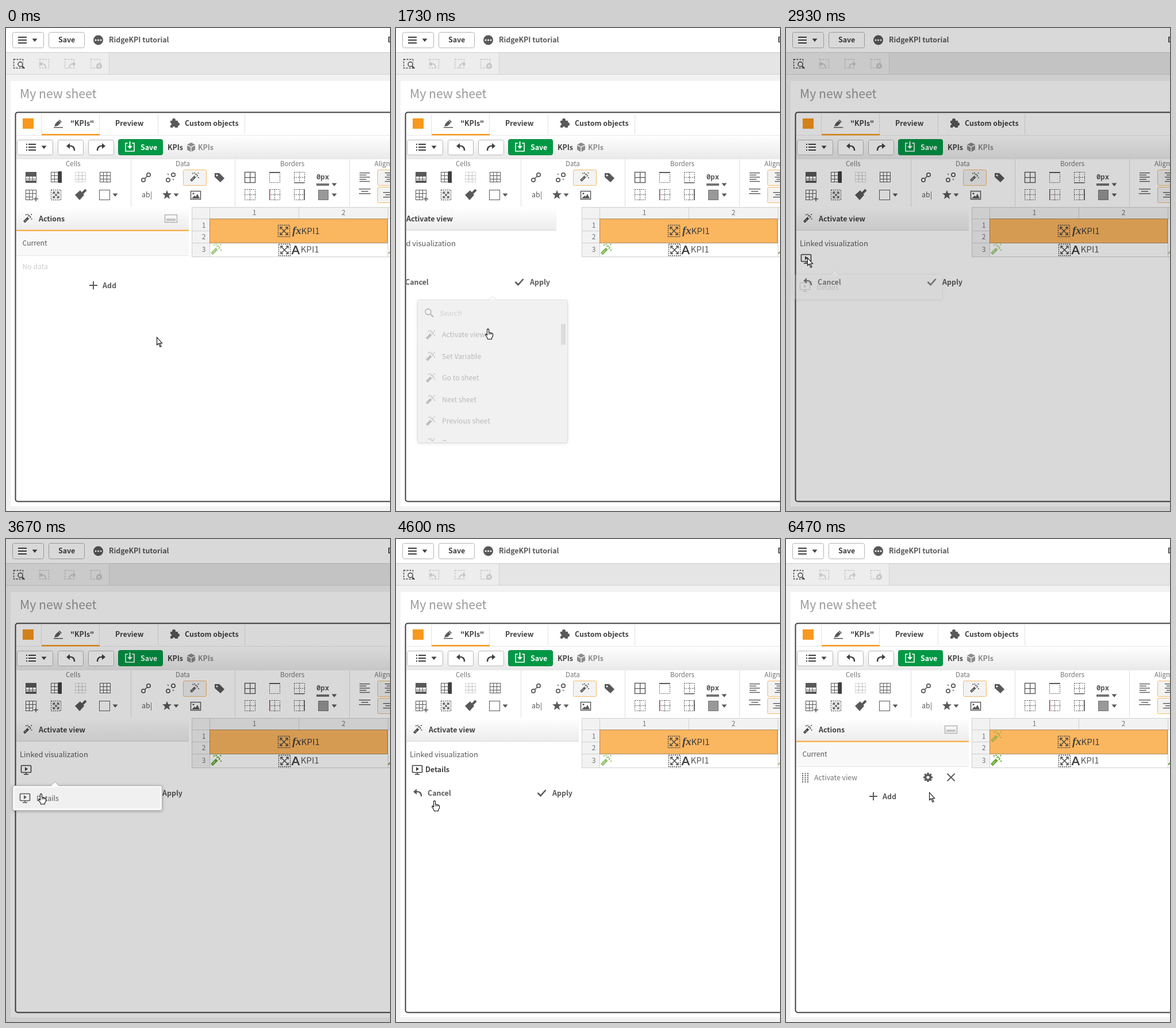
Write an HTML page with a canvas that moves like this. It is 668 px wide and 839 px high and loops after 6.54 s.

```html
<!DOCTYPE html>
<html lang="en">
<head>
<meta charset="utf-8">
<title>Sheet editor</title>
<style>
html, body { margin: 0; width: 100%; height: 100%; overflow: hidden; background: #f2f2f2; }
canvas { display: block; width: 668px; height: 839px; }
</style>
</head>
<body>
<canvas id="stage" width="668" height="839"></canvas>
<script>
const g = document.getElementById('stage').getContext('2d');
const LOOP = 6540, FRAME = 200 / 3;
const SANS = '"Noto Sans CJK JP", "Noto Sans CJK SC", "Noto Sans CJK", "Open Sans", sans-serif';
const INK = '#595959', DARK = '#404040', PALE = '#cccccc', ORANGE = '#f8981d', GREEN = '#5ba32b';

const clamp = v => Math.max(0, Math.min(1, v));
const smooth = v => v * v * (3 - 2 * v);

// --- drawing helpers ---
function rect(x, y, w, h, c) { g.fillStyle = c; g.fillRect(x, y, w, h); }
function frame(x, y, w, h, c, lw = 1) {
  g.strokeStyle = c; g.lineWidth = lw;
  g.strokeRect(x + .5, y + .5, w - 1, h - 1);
}
function round(x, y, w, h, r, fill, stroke, lw = 1) {
  g.beginPath(); g.roundRect(x + .5, y + .5, w - 1, h - 1, r);
  if (fill) { g.fillStyle = fill; g.fill(); }
  if (stroke) { g.strokeStyle = stroke; g.lineWidth = lw; g.stroke(); }
}
function trace(p) {
  g.beginPath();
  for (let i = 0; i < p.length; i += 2) g.lineTo(p[i], p[i + 1]);
}
function line(c, lw, ...p) { trace(p); g.strokeStyle = c; g.lineWidth = lw; g.stroke(); }
function poly(c, ...p) { trace(p); g.closePath(); g.fillStyle = c; g.fill(); }
function disc(x, y, r, c) { g.beginPath(); g.arc(x, y, r, 0, 7); g.fillStyle = c; g.fill(); }
function ring(x, y, r, c, lw) {
  g.beginPath(); g.arc(x, y, r, 0, 7); g.strokeStyle = c; g.lineWidth = lw; g.stroke();
}
function fade(x, y, w, h, a, b) {
  const k = g.createLinearGradient(0, y, 0, y + h);
  k.addColorStop(0, a); k.addColorStop(1, b);
  rect(x, y, w, h, k);
}
function text(s, x, mid, size, c, style = '', align = 'left', family = SANS) {
  g.font = `${style} ${size}px ${family}`;
  g.textAlign = align; g.fillStyle = c;
  g.fillText(s, x, mid + size * .365);
}
const bold = (s, x, mid, c = DARK, size = 12.4) => text(s, x, mid, size, c, 'bold');
function at(x, y, s, draw) { g.save(); g.translate(x, y); g.scale(s, s); draw(); g.restore(); }
function dashed(draw, ...d) { g.setLineDash(d); draw(); g.setLineDash([]); }

// --- icons ---
function caret(x, y, c = INK) { poly(c, x - 4.5, y - 2.5, x + 4.5, y - 2.5, x, y + 3); }
function wand(x, y, s, c) {
  at(x, y, s, () => {
    poly(c, 0, 13, 7.5, 5.5, 10.5, 8.5, 3, 16);
    line(c, 1.2, 8.6, 4.4, 10.4, 2.6, 13.4, 5.6, 11.6, 7.4);
    line('#ffffff', .8, 2.6, 13.4, 6.6, 9.4);
    for (const [a, b] of [[5, 1.5], [14.5, 1], [15, 9], [8, .8]]) rect(a - .9, b - .9, 1.8, 1.8, c);
  });
}
function cells(x, y, c) {
  frame(x, y, 19, 18, c);
  for (const d of [6, 12]) { rect(x + d, y, 1, 18, c); rect(x, y + d, 19, 1, c); }
}
function dotted(x, y, cross = true) {
  dashed(() => {
    frame(x, y, 19, 19, INK);
    if (cross) {
      line(INK, 1, x + 9.5, y, x + 9.5, y + 19);
      line(INK, 1, x, y + 9.5, x + 19, y + 9.5);
    }
  }, 2, 1.5);
}
function expand(x, y, s, c) {
  dashed(() => frame(x, y, s, s, c, 1.3), 2, 1.5);
  const a = x + 4, b = x + s - 4, t = y + 4, u = y + s - 4;
  line(c, 1.3, a, t, b, u); line(c, 1.3, b, t, a, u);
  for (const [p, q, i, j] of [[a, t, 1, 1], [b, t, -1, 1], [a, u, 1, -1], [b, u, -1, -1]])
    line(c, 1.3, p + 4 * i, q, p, q, p, q + 4 * j);
}
function turn(x, y, dir, c) {
  g.save(); g.translate(x, y); g.scale(dir, 1);
  poly(c, -8, -2, -2, -7, -2, 3);
  g.beginPath(); g.moveTo(-3, -2); g.quadraticCurveTo(6, -3, 6, 6);
  g.strokeStyle = c; g.lineWidth = 2.4; g.stroke();
  g.restore();
}
function tick(x, y, c) { line(c, 2.6, x - 7, y, x - 2, y + 5, x + 7, y - 5); }
function bars(x, y, widths, gap, centre) {
  widths.forEach((w, i) => rect(centre ? x + 10 - w / 2 : x, y + i * gap, w, 1.4, INK));
}
function screen(x, y, c) {
  round(x, y, 18, 13, 1, null, c, 1.6);
  poly(c, x + 7, y + 3, x + 7, y + 10, x + 12, y + 6.5);
  line(c, 1.5, x + 9, y + 13, x + 9, y + 16); rect(x + 5, y + 15, 8, 1.5, c);
}
function gear(x, y, c) {
  for (let i = 0; i < 8; i++) {
    const a = i * Math.PI / 4;
    line(c, 3.4, x, y, x + 8 * Math.cos(a), y + 8 * Math.sin(a));
  }
  disc(x, y, 6, c); disc(x, y, 2.6, '#fff');
}
function star(x, y, r, c) {
  const p = [];
  for (let i = 0; i < 10; i++) {
    const a = i * Math.PI / 5 - Math.PI / 2, q = i % 2 ? r * .42 : r;
    p.push(x + q * Math.cos(a), y + q * Math.sin(a));
  }
  poly(c, ...p);
}
function lens(x, y, c) { ring(x, y, 5, c, 1.8); line(c, 2.4, x + 4, y + 4, x + 9, y + 9); }

// --- page sections ---
function topBars() {
  rect(0, 0, 668, 839, '#f2f2f2');
  rect(0, 0, 668, 42, '#fff'); rect(0, 42, 668, 1, PALE);
  round(11, 7, 55, 28, 3, '#fff', '#b3b3b3');
  for (const y of [15, 20, 25]) rect(21, y, 15, 2, DARK);
  caret(50, 21, DARK);
  round(74, 7, 63, 28, 3, '#fff', '#b3b3b3');
  bold('Save', 91, 20.5);
  disc(160.5, 21, 8.5, INK);
  for (const x of [156, 160.5, 165]) disc(x, 21, 1.5, '#fff');
  bold('RidgeKPI tutorial', 179, 20.5, INK);
  bold('D', 664, 20.5);

  rect(0, 43, 179, 37, '#ededed'); rect(179, 43, 489, 37, '#e5e5e5');
  rect(179, 43, 1, 37, '#d4d4d4'); rect(0, 80, 668, 1, '#d2d2d2');
  [13, 58, 102, 147].forEach((x, i) => {
    const c = i ? '#c4c4c4' : DARK;
    dashed(() => frame(x, 54, 17, 16, c, 1.4), 3, 2);
    if (i == 0) { disc(x + 12, 63, 6, '#ededed'); at(x + 12, 63, .8, () => lens(0, 0, c)); }
    if (i == 1) at(x + 6, 64, .8, () => turn(0, 0, 1, c));
    if (i == 2) at(x + 13, 64, .8, () => turn(0, 0, -1, c));
    if (i == 3) {
      disc(x + 15, 66, 5, c);
      line('#ededed', 1.3, x + 13, 64, x + 17, 68); line('#ededed', 1.3, x + 17, 64, x + 13, 68);
    }
  });

  rect(8, 92, 660, 739, '#fff');
  text('My new sheet', 24, 114.5, 21.2, '#999');
  round(16, 146, 670, 677, 4, '#fff', DARK, 2);
}

function tabs() {
  rect(29, 157, 19, 18, ORANGE);
  for (const x of [61, 162, 264, 415]) rect(x, 149, 1, 36, '#e3e3e3');
  fade(18, 187, 650, 41, '#ffffff', '#e9e9e9');
  rect(18, 186, 650, 1, '#e8e8e8');
  rect(62, 184, 101, 2.5, ORANGE);
  poly(INK, 84, 171, 86, 166, 93, 159, 97, 163, 90, 170);
  line('#fff', 1, 91, 160, 96, 165); rect(83, 172, 16, 1.5, INK);
  bold('"KPIs"', 112, 165);
  bold('Preview', 190, 165);
  rect(286, 161, 13, 12, INK); disc(292, 160, 3, INK); disc(299, 167, 3, INK);
  disc(286, 167, 2, '#fff'); disc(292, 173, 2, '#fff');
  bold('Custom objects', 311, 165);

  for (const [x, w] of [[19, 63], [90, 45], [143, 45]]) round(x, 194, w, 27, 3, '#fff', '#b8b8b8');
  for (const y of [201, 206, 211]) { rect(35, y, 2, 2, DARK); rect(39, y, 13, 2, DARK); }
  caret(66, 207, DARK);
  turn(113, 207, 1, DARK); turn(165, 207, -1, DARK);
  round(195, 193, 78, 28, 3, '#009845', '#008a3f');
  line('#fff', 1.6, 212, 200, 208, 200, 208, 214, 223, 214, 223, 200, 219, 200);
  line('#fff', 2, 215.5, 197, 215.5, 207); poly('#fff', 211, 205, 220, 205, 215.5, 210);
  bold('Save', 234, 207, '#fff');
  bold('KPIs', 281, 207);
  poly('#8c8c8c', 322, 199, 329, 202.5, 322, 206, 315, 202.5);
  poly('#8c8c8c', 315, 204, 321.3, 207.3, 321.3, 215, 315, 211.5);
  poly('#8c8c8c', 329, 204, 322.7, 207.3, 322.7, 215, 329, 211.5);
  bold('KPIs', 334, 207, '#8c8c8c');
}

function ribbon() {
  rect(18, 228, 650, 83, '#fff');
  for (const x of [217, 398, 597]) rect(x, 228, 1, 82, '#dcdcdc');
  for (const [s, x] of [['Cells', 104], ['Data', 295], ['Borders', 477], ['Align', 641]])
    text(s, x, 236, 11.5, '#737373');

  cells(34, 250, INK); rect(34, 250, 19, 8, INK); rect(34, 265, 19, 4, INK);
  cells(78, 250, INK); rect(91, 249, 6, 20, DARK);
  dashed(() => cells(120, 250, '#c4c4c4'), 2, 1); rect(120, 256, 19, 1, '#c4c4c4');
  cells(163, 250, INK);
  cells(34, 281, INK); rect(47, 293, 9, 8, '#fff');
  rect(48, 296, 8, 1.6, INK); rect(51.2, 293, 1.6, 8, INK);
  expand(78, 281, 18, INK);
  poly(INK, 120, 290, 129, 282, 136, 290, 128, 299);
  line(INK, 4, 133, 287, 139, 281);
  frame(162, 281, 19, 18, INK); caret(190, 290);

  for (const x of [235, 278]) {
    ring(x + 4, 264, 3.2, INK, 1.7); ring(x + 13, 255, 3.2, INK, 1.7);
    if (x < 240) line(INK, 1.7, x + 6.5, 261.5, x + 10.5, 257.5);
    else for (const d of [0, 9])
      line(INK, 1.3, x + 3 + d, 253 + d, x + 5 + d, 255 + d);
  }
  round(308, 246, 41, 28, 2, '#f3f3f3', '#f5b868'); wand(320, 251, 1, INK);
  poly(INK, 363, 252, 371, 252, 380, 261, 373, 268, 363, 259); disc(367, 256, 1.6, '#fff');
  text('ab|', 236, 289.5, 12.4, INK);
  star(280, 290, 8.5, INK); caret(296, 290);
  frame(321, 283, 18, 15, INK, 1.5); disc(326, 287.5, 1.6, INK);
  poly(INK, 323, 296, 328, 291, 330, 293, 333, 288, 337, 296);

  frame(415, 250, 19, 19, INK, 1.4); rect(424, 250, 1.3, 19, INK); rect(415, 259, 19, 1.3, INK);
  dotted(458, 250, false); rect(458, 250, 19, 2, INK);
  dotted(501, 250); rect(501, 268, 18, 1.5, INK);
  text('0px', 540, 259, 12.2, INK, 'bold', 'left', '"Noto Sans Mono", monospace');
  rect(540, 270, 22, 4, '#737373'); caret(571, 272);
  dotted(415, 280); dotted(458, 280); rect(458, 280, 1.5, 19, '#8c4a5a');
  dotted(501, 280); rect(518, 280, 1.5, 19, INK);
  rect(543, 281, 18, 18, '#999'); frame(543, 281, 18, 18, '#737373'); caret(571, 290);

  for (const y of [246, 276]) round(646, y, 40, 28, 2, '#f3f3f3', '#f5b868');
  bars(615, 251, [18, 12, 18, 12, 18], 3.7);
  bars(658, 251, [18, 12, 18, 12, 18], 3.7, true);
  bars(614, 279, [20, 12, 20], 4, true); bars(656, 285, [20, 12, 20], 4, true);
}

function sheetGrid(pulse, second) {
  rect(323, 311, 345, 21, '#f2f2f2'); rect(323, 332, 31, 66, '#f2f2f2');
  for (const y of [311, 331, 397]) rect(323, y, 345, 1, '#cfcfcf');
  for (const y of [352, 373]) rect(323, y, 31, 1, '#cfcfcf');
  for (const x of [323, 354, 664]) rect(x, 311, 1, 87, '#cfcfcf');
  rect(509, 311, 1, 20, '#cfcfcf');
  rect(355, 332, 309, 41, '#fbb660'); frame(354, 331, 310, 43, '#a68c69');
  ['1', '2'].forEach((s, i) => text(s, 432 + 155 * i, 321, 12, '#737373', '', 'center'));
  ['1', '2', '3'].forEach((s, i) => text(s, 344, [342.5, 363, 385][i], 12, '#737373', '', 'center'));
  expand(473, 342, 21, DARK); expand(474, 375, 21, DARK);
  text('fx', 498, 351, 19, DARK, 'italic bold', 'left', '"Liberation Serif", serif');
  text('KPI1', 513.5, 352, 15.2, DARK);
  text('A', 496.5, 385, 21, DARK, 'bold', 'left', 'Lato, sans-serif');
  text('KPI1', 512.5, 384.5, 15.2, INK);
  g.globalAlpha = pulse;
  wand(356, 375, 1.2, GREEN);
  line(GREEN, 2, 665, 392, 669, 388);
  if (second !== null) { g.globalAlpha = second; wand(356, 334, 1.2, GREEN); }
  g.globalAlpha = 1;
}

function panelHead(title, rule) {
  fade(18, 311, 300, 40, '#ffffff', '#ececec');
  rect(18, 350.5, 300, rule ? 2.5 : 1.5, rule ? '#fbb04f' : '#dedede');
  wand(30, 323, .97, DARK);
  bold(title, 57, 331);
}
function actionsPanel(hover, filled) {
  panelHead('Actions', true);
  frame(276, 324, 22, 14, '#b3b3b3', 1.5); rect(279, 331, 16, 4, '#c4c4c4');
  rect(18, 354, 300, 42, '#f8f8f8'); rect(18, 395, 300, 1, '#e6e6e6');
  text('Current', 28.5, 374, 12.2, INK);
  if (filled) {
    for (let i = 0; i < 15; i++) rect(28 + i % 3 * 4.5, 406.5 + (i / 3 | 0) * 3.6, 2, 2, INK);
    text('Activate view', 49, 414.5, 12.3, '#737373');
    gear(247, 414, INK);
    line(INK, 1.8, 280.5, 407.5, 293.5, 420.5); line(INK, 1.8, 293.5, 407.5, 280.5, 420.5);
  } else text('No data', 28.5, 414.5, 12.2, PALE);
  const c = hover ? '#262626' : INK;
  rect(145, 446, 14, 2, c); rect(151, 440, 2, 14, c);
  bold('Add', 168, 447, c);
}
function viewPanel(chosen, pressed) {
  panelHead('Activate view', false);
  text('Linked visualization', 24, 374, 12.9, INK);
  screen(pressed ? 26 : 28, 393, DARK);
  if (chosen) bold('Details', 51, 400.5);
  turn(38, 441, 1, INK); bold('Cancel', 55, 441, INK);
  tick(253.5, 441, INK); bold('Apply', 272, 441, INK);
}

function bubble(x, y, w, h, tip) {
  g.save();
  g.shadowColor = 'rgba(0,0,0,.25)'; g.shadowBlur = 5; g.shadowOffsetY = 1;
  round(x, y, w, h, 3, '#fff', '#b3b3b3');
  g.restore();
  poly('#fff', tip - 7, y + 1.5, tip, y - 5.5, tip + 7, y + 1.5);
  line('#b3b3b3', 1, tip - 7, y + .5, tip, y - 6, tip + 7, y + .5);
}
function actionMenu(alpha, hover) {
  g.save(); g.globalAlpha = alpha;
  bubble(37, 472, 262, 249, 168);
  lens(56, 493, INK);
  text('Search', 75, 495.5, 12.2, '#999', 'italic');
  if (hover) rect(41, 514, 246, 36, '#f0f0f0');
  rect(287, 514, 8, 36, '#b8b8b8');
  g.beginPath(); g.rect(38, 513, 258, 205); g.clip();
  ['Activate view', 'Set Variable', 'Go to sheet', 'Next sheet', 'Previous sheet', 'Open'].forEach((s, i) => {
    const y = 533 + i * 37.5;
    wand(52, y - 8, 1, INK); text(s, 80, y, 12.3, INK);
  });
  g.restore();
}
function detailMenu(alpha, hover) {
  g.save(); g.globalAlpha = alpha;
  bubble(11, 428, 261, 44, 85);
  if (hover) rect(15, 432, 253, 36, '#f0f0f0');
  screen(24, 442, INK); text('Details', 53, 450.5, 12.2, INK);
  g.restore();
}

// --- pointer ---
const STOPS = [[0, 262, 537], [400, 166, 446], [800, 166, 446], [1330, 159, 522], [1790, 159, 522],
  [2530, 37, 399], [3200, 37, 399], [3870, 66, 454], [4600, 66, 454], [5200, 249, 440]];
const HANDS = [[330, 930], [1130, 1870], [3600, 4730], [5130, 5800]];
const within = (t, list) => list.some(([a, b]) => t >= a && t < b);

function pointer(t) {
  let x = 249, y = 440;
  for (let i = 1; i < STOPS.length; i++) {
    const [a, ax, ay] = STOPS[i - 1], [b, bx, by] = STOPS[i];
    if (t < b) {
      const k = smooth(clamp((t - a) / (b - a)));
      x = ax + (bx - ax) * k; y = ay + (by - ay) * k;
      break;
    }
  }
  const hand = [3, 1, 4.5, 0, 6, 1, 6, 6, 12, 8, 13, 9, 13, 13, 11, 16, 11, 18, 4, 18, 3, 15, 0, 11, 1, 9, 3, 11];
  const arrow = [0, 0, 0, 13, 3, 10.5, 5.5, 16.5, 7.5, 15.5, 5, 10, 9, 10];
  const isHand = within(t, HANDS);
  g.save();
  g.translate(Math.round(x) - (isHand ? 4 : 0) + .5, Math.round(y) + .5);
  trace(isHand ? hand : arrow); g.closePath();
  g.fillStyle = '#fff'; g.fill(); g.strokeStyle = '#111'; g.lineWidth = 1.1; g.stroke();
  if (isHand) for (const d of [6, 8.3, 10.6]) line('#111', .9, d, 7, d, 10);
  g.restore();
}

// --- timeline ---
const OPEN = 1520, BACK = 5795, SLIDE = 333;
const wave = (t, low) => .75 - .25 * Math.cos((t - low) / 1500 * 2 * Math.PI);

function draw(t) {
  g.globalAlpha = 1;
  topBars(); tabs(); ribbon();
  const beat = t > 400 && t < 599 ? 400 : t;
  sheetGrid(wave(beat, 2800), t >= BACK ? wave(t, BACK + 750) : null);

  const start = t >= BACK ? BACK : t >= OPEN ? OPEN : -SLIDE;
  const left = 1 - clamp((t - start) / SLIDE);
  g.save();
  g.beginPath(); g.rect(18, 311, 300, 510); g.clip();
  g.translate(Math.round(-300 * left * left), 0);
  if (t >= OPEN && t < BACK) viewPanel(t >= 4195, t >= 2925 && t < 4195);
  else actionsPanel(t >= 330 && t < 930, t >= BACK);
  g.restore();

  const menu = Math.min(clamp((t - 570) / 300), 1 - clamp((t - OPEN) / SLIDE));
  if (menu > 0) actionMenu(menu, t >= 1130);
  if (t >= 2925 && t < 4595) {
    rect(0, 0, 668, 839, 'rgba(0,0,0,.15)');
    const alpha = Math.min(clamp((t - 2865) / 330), 1 - clamp((t - 4220) / 333));
    if (alpha > 0) detailMenu(alpha, t >= 3600);
  }
  pointer(t);
}

function tick15() {
  const step = Math.floor((performance.now() % LOOP + 5) / FRAME);
  draw(Math.min(step, 97) * FRAME);
  requestAnimationFrame(tick15);
}
tick15();
</script>
</body>
</html>
```
